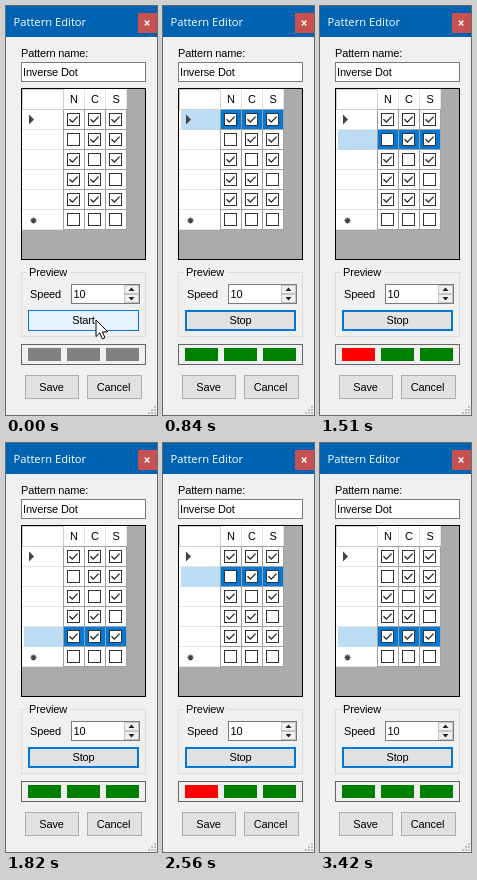
Recreate the animation shown at these times as an HTML page. Size 151 by 409 pixels, loop 3500 ms.

```html
<!DOCTYPE html>
<html lang="en">
<head>
<meta charset="utf-8">
<title>Pattern Editor</title>
<style>
  html, body { margin: 0; width: 100%; height: 100%; overflow: hidden; background: #f0f0f0; }
  svg { display: block; width: 100%; height: 100%; shape-rendering: crispEdges; }
  text { font: 11px "Liberation Sans", Arial, sans-serif; letter-spacing: -.15px; fill: #000; }
  .title { font: 11.2px "Open Sans", "Noto Sans", sans-serif; letter-spacing: 0; fill: #fff; }
  .mid { text-anchor: middle; }
  .smooth { shape-rendering: auto; }
</style>
</head>
<body>
<svg id="stage" viewBox="0 0 151 409"></svg>
<script>
const LOOP = 3500;
const ROWS = ["111", "011", "101", "110", "111", "000"];
const PLAYED = 5;
const BLUE = "#0078d7";
const stage = document.getElementById("stage");

// Moments at which the preview advances by one row.
const ticks = [300, 400, 510, 610, 720, 830, 950, 1060, 1180, 1280,
  1390, 1490, 1600, 1740, 1820, 1920, 2030, 2140, 2250, 2330,
  2450, 2560, 2660, 2790, 2890, 2980, 3120, 3220, 3320, 3420];

// Pointer stops: time, x, y of the tip.
const stops = [[0, 90, 314], [200, 97, 313], [300, 112, 311], [400, 131, 309]];
const EDGE_IN = 510, EDGE_OUT = 560, PRESS = 50, RUN = 130;

function add(tag, attrs, content) {
  const el = document.createElementNS("http://www.w3.org/2000/svg", tag);
  set(el, attrs);
  if (content) el.textContent = content;
  stage.appendChild(el);
  return el;
}
function set(el, attrs) {
  for (const k in attrs) el.setAttribute(k, attrs[k]);
}
function rect(x, y, width, height, fill) {
  return add("rect", { x, y, width, height, fill });
}
function box(x, y, w, h, fill, stroke) {
  return add("rect", { x: x + .5, y: y + .5, width: w - 1, height: h - 1, fill, stroke });
}
function path(d, attrs) {
  return add("path", { d, class: "smooth", fill: "none", ...attrs });
}
function label(x, y, str, cls = "") {
  return add("text", { x, y, class: cls }, str);
}
function show(el, on) {
  el.setAttribute("visibility", on ? "visible" : "hidden");
}

// Window frame
rect(0, 0, 151, 409, "#f0f0f0");
rect(0, 0, 151, 31, "#0063b1");
label(7.5, 20, "Pattern Editor", "title");
rect(132, 7, 19, 20, "#c75050");
path("M138.8 14.5l4.6 5m0-5l-4.6 5", { stroke: "#fff", "stroke-width": 1.3 });

// Name field
label(15, 51, "Pattern name:");
box(15, 56, 125, 20, "#fff", "#7a7a7a");
label(17, 70, "Inverse Dot");

// Grid
const colX = c => 58 + 21 * c;
const rowY = r => 104 + 20 * r;
box(15, 82, 125, 172, "#ababab", "#000");
rect(16, 83, 105, 141, "#fff");
["N", "C", "S"].forEach((s, c) => {
  label(colX(c) + 10, 97, s, "mid");
  rect(colX(c) + 20, 83, 1, 20, "#e5e5e5");
});

const rows = ROWS.map((bits, r) => {
  const y = rowY(r);
  rect(16, y + 19, 42, 1, "#e5e5e5");
  rect(58, y + 19, 63, 1, "#a0a0a0");
  const head = rect(18, y, 39, 20, "none");
  const cells = [...bits].map((bit, c) => {
    const x = colX(c);
    const cell = rect(x, y, 20, 19, "#fff");
    box(x + 3, y + 3, 13, 13, "#fff", "#333");
    if (bit === "1") {
      path(`M${x + 5.5} ${y + 9.3}l2.8 2.9l5.3-5.6`, { stroke: "#222", "stroke-width": 1.25 });
    }
    return cell;
  });
  return { head, cells };
});
rect(58, 103, 63, 1, "#a0a0a0");
[57, 78, 99, 120].forEach(x => rect(x, 104, 1, 120, "#a0a0a0"));
box(16, 83, 42, 21, "none", "#d0d0d0");
path("M23 108.5v10l5-5z", { fill: "#444" });
path("M27.5 211.5v6m-3-3h6m-5-2l4 4m0-4l-4 4", { stroke: "#444", "stroke-width": 1.3 });

// Preview group
box(15, 266, 125, 65, "none", "#dcdcdc");
rect(21, 264, 43, 5, "#f0f0f0");
label(23, 270, "Preview");
label(24, 292, "Speed");
box(65, 278, 69, 20, "#fff", "#7a7a7a");
label(67.5, 292, "10");
box(118, 279, 15, 9, "#f0f0f0", "#c4c4c4");
box(118, 288, 15, 9, "#f0f0f0", "#c4c4c4");
path("M122.5 285h6l-3-3.5z", { fill: "#222" });
path("M122.5 291h6l-3 3.5z", { fill: "#222" });

const button = add("rect", {});
const caption = label(77.5, 318, "Start", "mid");

// Lamps
box(15, 338, 125, 21, "#f0f0f0", "#646464");
const lamps = [22, 61, 100].map(x => rect(x, 342, 33, 13, "#808080"));

// Bottom buttons
[[19, 54, "Save"], [81, 55, "Cancel"]].forEach(([x, w, s]) => {
  box(x, 369, w, 24, "#e1e1e1", "#adadad");
  label(x + 26.5, 385, s, "mid");
});
for (let i = 0; i < 3; i++) {
  for (let j = 0; j <= i; j++) rect(148 - 3 * j, 400 + 3 * i, 2, 2, "#bfbfbf");
}

// Pointers
const arrow = path("M0 0v16.5l3.8-3.6l2.6 6l2.6-1.1l-2.6-5.9h5.4z", { fill: "#fff", stroke: "#000" });
const resize = path("M141 308.5l5.2-5.2v3.2h8v4h-8v3.2z", { fill: "#fff", stroke: "#000" });

function drawButton(t) {
  const running = t >= RUN;
  const pressed = t >= PRESS && !running;
  const inset = running ? 1 : .5;
  set(button, {
    x: 22 + inset, y: 304 + inset, width: 111 - 2 * inset, height: 21 - 2 * inset,
    "stroke-width": 2 * inset,
    stroke: pressed ? "#005499" : BLUE,
    fill: pressed ? "#cce4f7" : t < 400 ? "#e5f1fb" : "#e1e1e1"
  });
  caption.textContent = running ? "Stop" : "Start";
}

function draw(t) {
  const step = ticks.filter(m => m <= t).length - 1;
  const active = step < 0 ? -1 : step % PLAYED;
  rows.forEach(({ head, cells }, r) => {
    const on = r === active;
    head.setAttribute("fill", on ? "#bcdcf4" : "none");
    cells.forEach(c => c.setAttribute("fill", on ? BLUE : "#fff"));
  });
  lamps.forEach((lamp, i) => lamp.setAttribute("fill",
    active < 0 ? "#808080" : ROWS[active][i] === "1" ? "#008000" : "#f00"));
  drawButton(t);

  const [, x, y] = stops.filter(s => s[0] <= t).pop();
  arrow.setAttribute("transform", `translate(${x} ${y})`);
  show(arrow, t < EDGE_IN);
  show(resize, t >= EDGE_IN && t < EDGE_OUT);
}

const start = performance.now();
function tick() {
  draw((performance.now() - start) % LOOP);
  requestAnimationFrame(tick);
}
draw(0);
requestAnimationFrame(tick);
</script>
</body>
</html>
```
